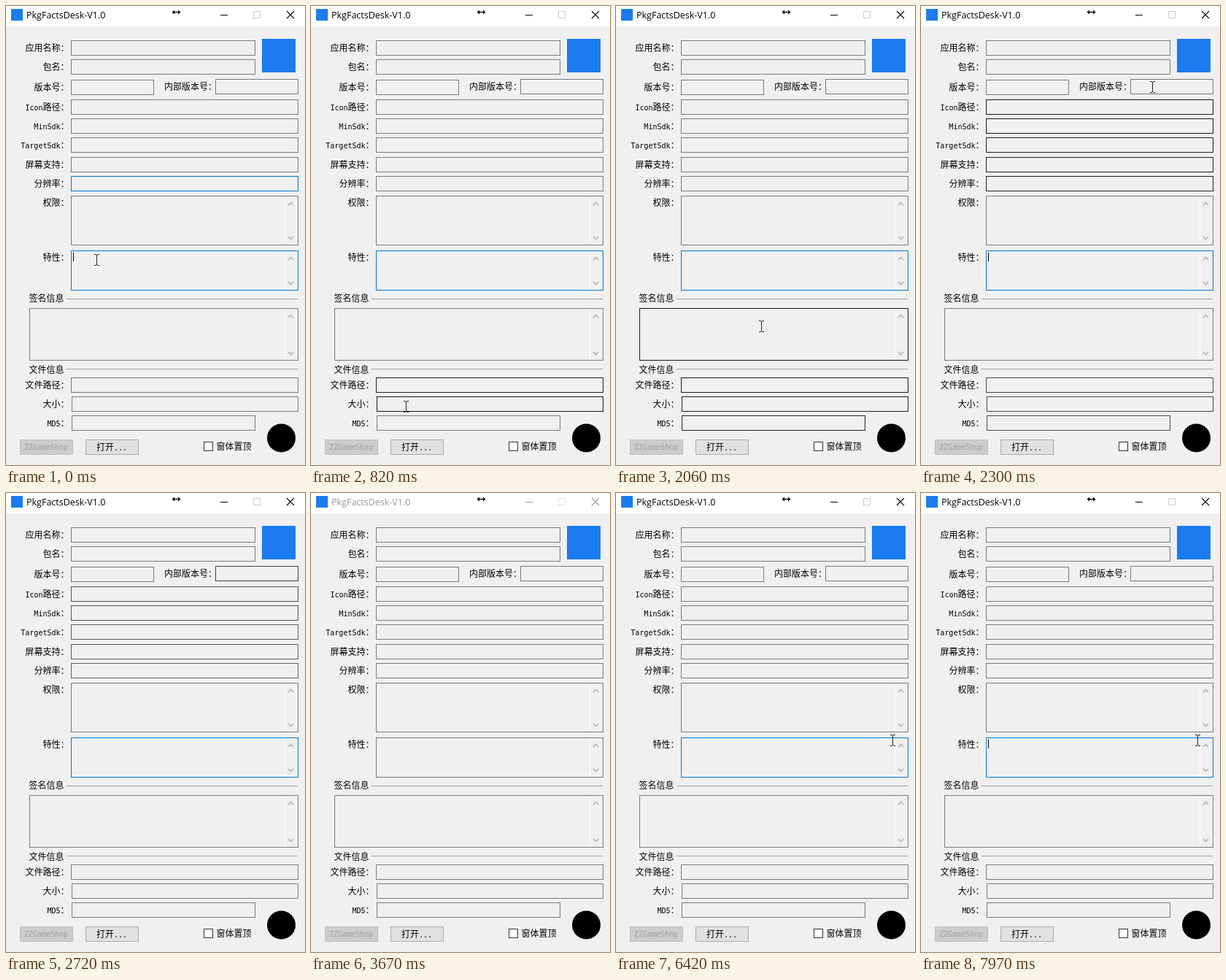
An HTML page for the animation above (8 s loop, 410 by 629 pixels).

```html
<!DOCTYPE html>
<html lang="zh-CN">
<head>
<meta charset="utf-8">
<title>PkgFactsDesk</title>
<style>
html, body { margin: 0; width: 100%; height: 100%; overflow: hidden; background: #f0f0f0; }
svg { display: block; width: 410px; height: 629px; }
text { font: 12px "Noto Sans CJK SC", "Noto Sans CJK", sans-serif; white-space: pre; }
.mono { font: 10px "DejaVu Sans Mono", monospace; }
.title { font: 12.5px "Open Sans", "Noto Sans", sans-serif; }
</style>
</head>
<body>
<svg id="stage" viewBox="0 0 410 629"></svg>
<script>
const LOOP = 8000;
const STEP = 135;      // screen refresh, ms
const PHASE = .2;      // refreshes land slightly ahead of the grid
const AWAY = 27;       // refresh at which the window is inactive
const BLINK = 525;
const FADE = 650;      // hover border fade, ms
const LAG = 30;        // delay before hover registers, ms
const BLUE = '#0078d7';
const stage = document.getElementById('stage');

function add(tag, attrs, parent = stage) {
  const el = document.createElementNS('http://www.w3.org/2000/svg', tag);
  for (const k in attrs) el.setAttribute(k, attrs[k]);
  parent.appendChild(el);
  return el;
}
const box = (x, y, w, h, fill, stroke) =>
  add('rect', { x: x + .5, y: y + .5, width: w - 1, height: h - 1, fill, stroke });
const square = (x, y, size) =>
  add('rect', { x, y, width: size, height: size, fill: '#1a7cf0' });
const line = (d, stroke, width = 1) =>
  add('path', { d, stroke, fill: 'none', 'stroke-width': width });

// Latin runs use a half-width mono face beside the full-width glyphs
function write(str, x, cy, anchor = 'start', fill = '#000') {
  const el = add('text', { x, y: cy + 4.5, 'text-anchor': anchor, fill });
  for (const run of str.match(/[\x20-\x7e]+|[^\x20-\x7e]+/g)) {
    const span = add('tspan', /^[\x20-\x7e]/.test(run) ? { class: 'mono' } : {}, el);
    span.textContent = run;
  }
}

// Title bar
add('rect', { width: 410, height: 28, fill: '#fff' });
square(7, 4, 16);
const title = add('text', { x: 28, y: 17, class: 'title' });
title.textContent = 'PkgFactsDesk-V1.0';
const minimise = line('M294 12.5H304', '#000');
const maximise = box(339, 7, 10, 10, 'none', '#ccc');
const closeX = line('M385 7L395 17M395 7L385 17', '#000', 1.1);
line('M229 8.5H238', '#000', 1.4);
add('path', { d: 'M227.5 8.5L231 5.5V11.5ZM239.5 8.5L236 5.5V11.5Z' });
square(351, 45, 46);

// Text fields; the tall ones carry a scrollbar
const fields = [];
function field(label, x, y, right, h = 21) {
  const tall = h > 21;
  if (label) write(label + '：', x > 200 ? x + 2 : 86.5, y + (tall ? 9 : 10), 'end');
  const f = { x, y, w: right - x, h, tall, el: box(x, y, right - x, h, '#f0f0f0') };
  if (tall) {
    const b = y + h;
    line(`M382.5 ${y + 2}V${b - 2}`, '#fff');
    line(`M387 ${y + 13}l3.5 -3.5l3.5 3.5M387 ${b - 12}l3.5 3.5l3.5 -3.5`, '#bfbfbf', 2);
  }
  fields.push(f);
  return f;
}
function group(label, cy, lineY) {
  write(label, 31.5, cy);
  line(`M83 ${lineY}H400`, '#a0a0a0');
}

['应用名称', '包名'].forEach((s, i) => field(s, 89, 47 + 26 * i, 342));
field('版本号', 89, 101, 203);
field('内部版本号', 287, 100, 401);
const rows = ['Icon路径', 'MinSdk', 'TargetSdk', '屏幕支持', '分辨率']
  .map((s, i) => field(s, 89, Math.round(128 + 26.2 * i), 401));
const lastFocus = rows[4];
field('权限', 89, 260, 401, 68);
const focused = field('特性', 89, 335, 401, 55);
group('签名信息', 400, 401.5);
field('', 32, 414, 401, 72);
group('文件信息', 498, 497.5);
field('文件路径', 89, 509, 401);
field('大小', 90, 535, 401);
field('MD5', 90, 561, 342);

// Footer
box(19, 594, 73, 21, '#ccc', '#bfbfbf');
write('ZZGameShop', 55, 603.5, 'middle', '#a0a0a0');
const button = { x: 109, y: 594, w: 73, h: 21, el: box(109, 594, 73, 21) };
write('打开...', 145, 604, 'middle');
box(271, 597, 13, 13, '#fff', '#333');
write('窗体置顶', 288.5, 603.5);
add('circle', { cx: 377.5, cy: 592, r: 19.5 });

const caret = add('rect', { x: 92, y: 338, width: 1, height: 12 });
const beam = line('M-3 -7.5H-1L.5 -6.5L2 -7.5H4M.5 -7V7M-3 7.5H-1L.5 6.5L2 7.5H4', '#222');
const arrow = add('path', {
  d: 'M.5 .5V16.5L4.2 13L6.8 18.5L9.2 17.5L6.7 12H11.5Z', fill: '#fff', stroke: '#000'
});

// Pointer key points: refresh count, x, y
const PATH = [
  [0, 124, 348], [3, 123, 487], [4, 123, 490], [8, 137, 607], [10, 140, 603],
  [14, 140, 603], [17, 317, 111], [18, 430, 105], [28, 430, 352], [32, 379, 339]
];

function pointerAt(ms) {
  const n = Math.max(0, ms / STEP);
  const i = PATH.findIndex(p => p[0] > n);
  if (i < 0) return PATH[PATH.length - 1].slice(1);
  const [a, b] = [PATH[i - 1], PATH[i]];
  const k = (n - a[0]) / (b[0] - a[0]);
  return [1, 2].map(c => a[c] + (b[c] - a[c]) * k);
}

const inside = (r, [x, y]) => x >= r.x && x < r.x + r.w && y >= r.y && y < r.y + r.h;
const show = (el, on) => el.setAttribute('visibility', on ? 'visible' : 'hidden');
const paint = (el, stroke, fill) => {
  el.setAttribute('stroke', stroke);
  if (fill) el.setAttribute('fill', fill);
};

// 1 while hovered; single-line fields fade out, tall ones drop at once
function heat(f, now) {
  const span = f.tall ? 1 : FADE;
  for (let age = 0; age < span; age += 5)
    if (inside(f, pointerAt(now - LAG - age))) return 1 - age / span;
  return 0;
}
const grey = level => {
  const v = Math.round(122 - 99 * level);
  return `rgb(${v},${v},${v})`;
};

function draw(t) {
  const n = Math.floor(t / STEP + PHASE);
  const now = n * STEP;
  const active = n !== AWAY;

  for (const f of fields) paint(f.el, grey(heat(f, now)));
  if (active) paint(focused.el, BLUE);
  if (n === 0) paint(lastFocus.el, BLUE);

  title.setAttribute('fill', active ? '#000' : '#999');
  for (const el of [minimise, closeX]) paint(el, active ? '#000' : '#999');
  paint(maximise, active ? '#ccc' : '#e5e5e5');

  const pos = pointerAt(now);
  const hover = inside(button, pos);
  paint(button.el, hover ? BLUE : '#adadad', hover ? '#e5f1fb' : '#e1e1e1');

  const overText = fields.some(f => inside(f, pos) && !(f.tall && pos[0] > 382));
  show(beam, overText);
  show(arrow, !overText);
  (overText ? beam : arrow).setAttribute('transform', `translate(${pos.map(Math.round)})`);

  // The caret restarts when the window regains focus
  const since = n > AWAY ? t - (AWAY + 1 - PHASE) * STEP : t;
  show(caret, active && Math.floor(since / BLINK) % 2 === 0);
}

const start = performance.now();
function tick() {
  draw((performance.now() - start) % LOOP);
  requestAnimationFrame(tick);
}
tick();
</script>
</body>
</html>
```
